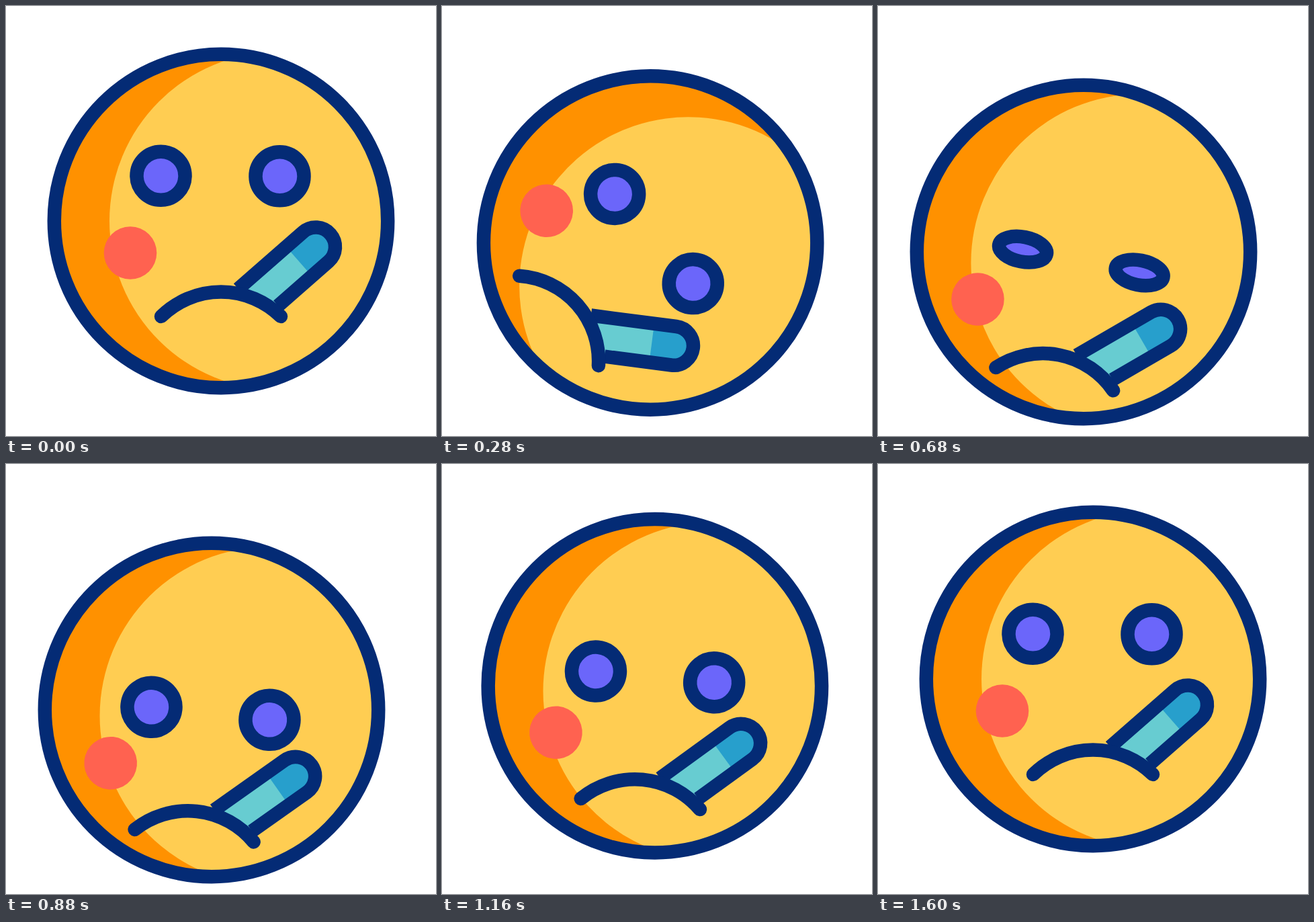
Animation, 640 px wide and 640 px high, one loop 2 s. Source, as an HTML page:

```html
<!DOCTYPE html>
<html lang="en">
<head>
<meta charset="utf-8">
<title>Sick face</title>
<style>
  html, body { margin: 0; height: 100%; overflow: hidden; background: #fff; }
  svg { display: block; width: 100%; height: 100%; }
  .line { stroke: #042b75; stroke-width: 20.5; }
</style>
</head>
<body>
<svg viewBox="0 0 640 640" fill="none">
  <clipPath id="disc"><circle r="248"/></clipPath>
  <g id="head">
    <circle r="248" fill="#ff9100"/>
    <g clip-path="url(#disc)">
      <g id="light"><circle cx="85.5" r="251.5" fill="#ffcd52"/></g>
    </g>
    <circle r="248.2" class="line"/>
    <g id="eyes" class="line" fill="#6b66fa">
      <ellipse cx="-89.5" cy="-67.3" rx="36" ry="36"/>
      <ellipse cx="87.5" cy="-66.7" rx="36" ry="36"/>
    </g>
    <g id="mouth">
      <circle cx="-135" cy="47.5" r="39.3" fill="#ff6250"/>
      <g transform="translate(141 38.5) rotate(138.8)">
        <path d="M128 29H0A29 29 0 0 1 0-29H100" fill="#67ccd1"/>
        <path d="M33 29H0A29 29 0 0 1 0-29H33" fill="#279fcc"/>
        <path d="M128 29H0A29 29 0 0 1 0-29H100" class="line"/>
      </g>
      <path d="M-89 142A127 127 0 0 1 89 142" class="line" stroke-linecap="round"/>
    </g>
  </g>
</svg>
<script>
const LOOP = 2000, STEP = 40;

// time, tilt, eye drop, mouth shift x, mouth shift y
const keys = [
  [0, 0, 0, 0, 0],
  [280, 48.6, 59, -3, 36.7],
  [440, 18.1, 92, -5.8, 57],
  [680, 11.1, 81, -6, 52],
  [1040, 3.9, 64, -6.4, 41.5],
  [1280, 6.5, 40.4, -4, 26.5],
  [1600, 0, 0, 0, 0]
];

const ease = (t, from, to) => {
  const u = Math.min(1, Math.max(0, (t - from) / (to - from)));
  return u * u * (3 - 2 * u);
};

const secant = (i, col) =>
  (keys[i + 1][col] - keys[i][col]) / (keys[i + 1][0] - keys[i][0]);

// Flat at turning points and ends, harmonic mean elsewhere
function slope(i, col) {
  if (i === 0 || i === keys.length - 1) return 0;
  const a = secant(i - 1, col), b = secant(i, col);
  return a * b <= 0 ? 0 : 2 * a * b / (a + b);
}

function track(t, col) {
  let i = 0;
  while (i < keys.length - 2 && t >= keys[i + 1][0]) i++;
  const span = keys[i + 1][0] - keys[i][0];
  const u = Math.min(1, (t - keys[i][0]) / span), v = 1 - u;
  return v * v * (1 + 2 * u) * keys[i][col] + u * u * (3 - 2 * u) * keys[i + 1][col]
    + span * u * v * (v * slope(i, col) - u * slope(i + 1, col));
}

const part = id => document.getElementById(id);
const [head, light, eyes, mouth] = ['head', 'light', 'eyes', 'mouth'].map(part);
const place = (el, value) => el.setAttribute('transform', value);

function draw(t) {
  const drop = ease(t, 20, 425) - ease(t, 893, 1278);
  const blink = ease(t, 520, 680) - ease(t, 680, 860);
  const [tilt, eyeY, mouthX, mouthY] = [1, 2, 3, 4].map(col => track(t, col));
  const turn = `rotate(${tilt})`;
  place(head, `translate(${320 - 14 * drop} ${320 + 46 * drop})`);
  place(light, turn);
  place(eyes, `${turn} translate(0 ${eyeY})`);
  place(mouth, `${turn} translate(${mouthX} ${mouthY})`);
  for (const eye of eyes.children) eye.setAttribute('ry', 36 - 17.6 * blink);
}

function tick() {
  draw(Math.floor(performance.now() % LOOP / STEP) * STEP);
  requestAnimationFrame(tick);
}
tick();
</script>
</body>
</html>
```
